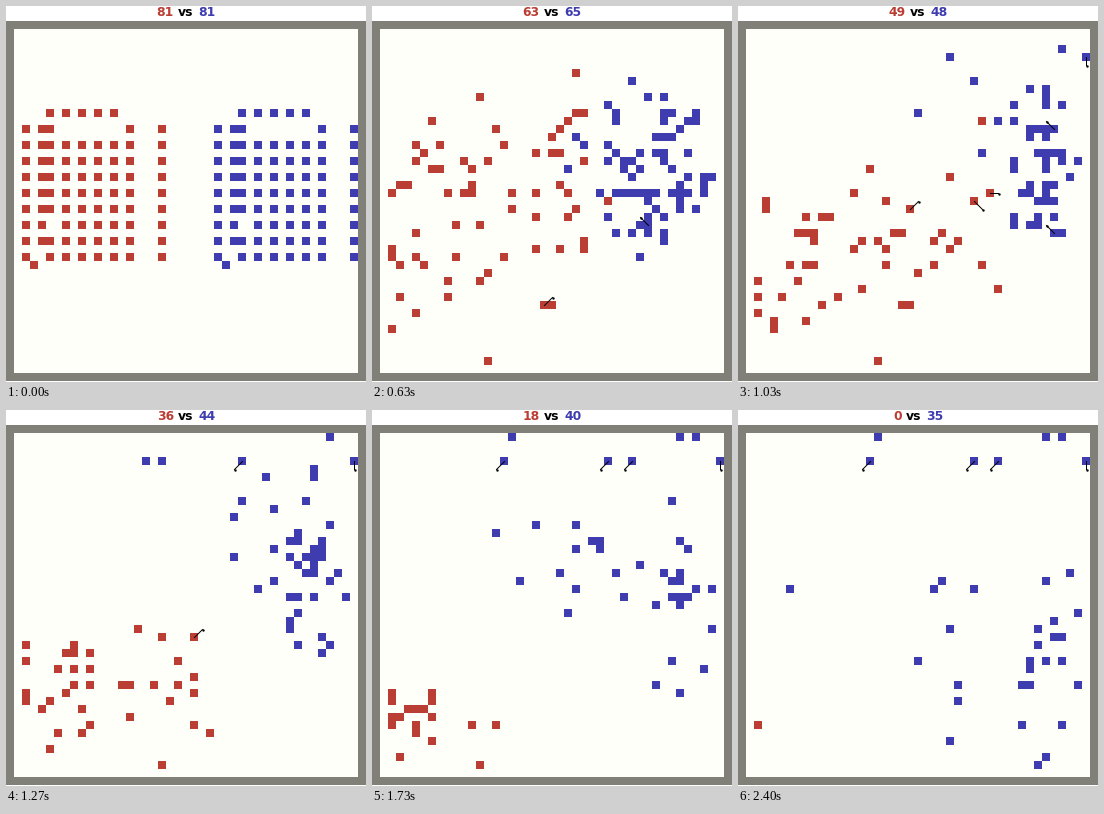
A matplotlib script for the animation above (2.43 s loop, 360 px wide and 376 px high).

```python
import numpy as np
import matplotlib.pyplot as plt
from matplotlib.animation import FuncAnimation

W, H = 360, 376
DPI = 80
PT = 72 / DPI
CELL, TOP, GRID = 8, 15, 45
TICK, LOOP, STEPS = 10, 2430, 73

FLOOR = (254, 255, 249)
WALL = (128, 128, 120)
RED = (186, 62, 52)
BLUE = (62, 60, 174)

# Survivors of each side over time.
SCORE_STEPS = [0, 10, 19, 31, 45, 59, 72]
SCORES = {"red": [81, 79, 63, 49, 24, 13, 0],
          "blue": [81, 79, 65, 48, 41, 39, 35]}

# Where each squad gathers: step, centre column and row, half width and height.
SQUADS = {
    "red front": [(10, 25, 19, 3, 8), (19, 26, 19, 3, 9),
                  (31, 31, 18, 5, 4), (45, 32, 30, 4, 5)],
    "red rear": [(10, 9, 22, 7, 15), (19, 11, 25, 8, 14), (31, 15, 30, 11, 8),
                 (45, 17, 35, 13, 4), (59, 13, 36, 11, 3), (72, 4, 34, 2, 2)],
    "blue front": [(10, 27, 19, 3, 9), (19, 29, 19, 5, 9),
                   (31, 35, 18, 5, 7), (72, 36, 29, 5, 8)],
    "blue guard": [(10, 36, 19, 5, 8), (31, 37, 18, 4, 7),
                   (45, 36, 17, 4, 8), (72, 35, 30, 6, 7)],
    "blue raiders": [(10, 37, 18, 5, 8), (31, 36, 16, 5, 8),
                     (45, 25, 14, 10, 6), (59, 16, 20, 10, 6),
                     (72, 17, 28, 10, 8)],
}

# Blue sentries leave for fixed posts along the top wall and stay there.
POSTS = [(43, 4), (38, 1), (40, 1), (32, 4), (29, 4), (17, 1), (16, 4)]
LEAVE = 22

rng = np.random.default_rng(7)


def formation():
    files = [7, 9, 11, 13, 15, 19]
    rows = {r: [2, 4, 5] + files for r in range(15, 29, 2)}
    rows.update({11: files[:-1], 13: [2, 4, 5, 15, 19], 25: [2, 4] + files,
                 29: [2, 5] + files, 30: [3]})
    rows[11] = [5] + files[:-2]
    return [(c, r) for r, cols in rows.items() for c in cols]


class Unit:
    def __init__(self, side, squad, cell):
        self.side, self.squad, self.cell = side, squad, cell
        self.offset = np.zeros(2)
        self.post = None

    def goal(self, step):
        if self.post and step >= LEAVE:
            return np.array(self.post)
        keys = np.array(SQUADS[self.squad]).T
        c, r, w, h = (np.interp(step, keys[0], k) for k in keys[1:])
        self.offset += rng.normal(0, 0.06, 2)
        return np.clip((c, r) + self.offset * (w, h), 2, GRID - 3)

    def move(self, step, taken):
        gap = np.rint(self.goal(step) - self.cell).astype(int)
        way = np.sign(gap)
        cell = (self.cell[0] + way[0], self.cell[1] + way[1])
        if cell not in taken:
            taken.discard(self.cell)
            taken.add(cell)
            self.cell = cell


def muster():
    units = []
    for i, (c, r) in enumerate(formation()):
        units.append(Unit("red", "red front" if c >= 11 else "red rear", (c, r)))
        squad = ("blue front" if c <= 7 else
                 "blue raiders" if (c + r + i) % 2 else "blue guard")
        units.append(Unit("blue", squad, (c + 24, r)))

    # Keep each unit's place within its squad, loosened by some noise.
    for name in SQUADS:
        squad = [u for u in units if u.squad == name]
        spots = np.array([u.cell for u in squad], float)
        low, high = spots.min(axis=0), spots.max(axis=0)
        places = 2 * (spots - low) / (high - low) - 1
        for u, place in zip(squad, places):
            u.offset = np.clip(0.8 * place + rng.normal(0, 0.35, 2), -1.2, 1.2)

    guards = [u for u in units if u.squad == "blue guard"]
    for u, post in zip(guards, POSTS):
        u.post = post
    return units


def gaps(units, foes):
    """Offset from each unit to its nearest foe."""
    a = np.array([u.cell for u in units])
    b = np.array([u.cell for u in foes])
    gap = b[None] - a[:, None]
    return gap[np.arange(len(a)), (gap ** 2).sum(axis=2).argmin(axis=1)]


def cull(units, foes, count):
    """Drop the units closest to the enemy, with some luck involved."""
    if len(units) <= count:
        return units
    risk = abs(gaps(units, foes)).max(axis=1) + 7 * rng.random(len(units))
    risk += [100 * bool(u.post) for u in units]
    keep = set(np.argsort(risk)[len(units) - count:])
    return [u for i, u in enumerate(units) if i in keep]


def strikes(units, foes):
    hits = []
    for u, gap in zip(units, gaps(units, foes)):
        reach = abs(gap).max()
        chance = 0.35 if reach <= 1 else 0.08 if reach <= 10 else 0
        way = np.sign(gap)
        if u.post == u.cell:
            if u.cell[1] > 1:
                hits.append((u.cell, (0 if u.cell[0] == GRID - 2 else -1, 1)))
        elif rng.random() < chance and way.any():
            hits.append((u.cell, tuple(way)))
    return hits


def battle():
    units = muster()
    red, blue = ([u for u in units if u.side == s] for s in ("red", "blue"))
    states = []
    for step in range(STEPS):
        score = [round(np.interp(step, SCORE_STEPS, SCORES[s]))
                 for s in ("red", "blue")]
        hits = []
        if step:
            taken = {u.cell for u in red + blue}
            for u in rng.permutation(np.array(red + blue, dtype=object)):
                u.move(step, taken)
            red = cull(red, blue, max(score[0], 1))
            blue = cull(blue, red, score[1])
            hits = strikes(red, blue) + strikes(blue, red)
        states.append(([u.cell for u in red], [u.cell for u in blue], hits, score))
    return states


states = battle()

field = np.full((GRID, GRID, 3), WALL, np.uint8)
field[1:-1, 1:-1] = FLOOR

fig = plt.figure(figsize=(W / DPI, H / DPI), dpi=DPI, facecolor="white")
ax = fig.add_axes([0, 0, 1, 1])
ax.axis("off")
board = ax.imshow(field, extent=(0, W, TOP + GRID * CELL, TOP),
                  interpolation="nearest", aspect="auto")
ax.set_xlim(0, W)
ax.set_ylim(H, 0)

lines, = ax.plot([], [], color="black", lw=PT)
tips, = ax.plot([], [], "o", color="black", ms=2.4 * PT, mew=0)

# Advance widths of the bold title face, in pixels.
SIZE = 12.4
DIGIT, SPACE, VS = 0.696 * SIZE, 0.348 * SIZE, 1.247 * SIZE


def label(color, text=""):
    return ax.text(0, 10.5, text, color=color, fontsize=SIZE * PT, va="baseline",
                   family="DejaVu Sans", weight="bold")


left = label(np.array(RED) / 255)
middle = label("black", "vs")
right = label(np.array(BLUE) / 255)


def set_title(score):
    a, b = map(str, score)
    x = (W - DIGIT * len(a + b) - 2 * SPACE - VS) / 2
    left.set_text(a)
    left.set_x(x)
    x += DIGIT * len(a) + SPACE
    middle.set_x(x)
    right.set_text(b)
    right.set_x(x + VS + SPACE)


def centre(c, r):
    return CELL * (c + 0.5) + 0.5, TOP + CELL * (r + 0.5) + 0.5


def update(tick):
    # Thirty steps a second, each starting on a 10 ms tick.
    red, blue, hits, score = states[min((3 * tick + 1) // 10, STEPS - 1)]
    img = field.copy()
    for team, color in ((red, RED), (blue, BLUE)):
        for c, r in team:
            img[r, c] = color
    board.set_data(img)

    xs, ys, ends = [], [], []
    for (c, r), (dx, dy) in hits:
        p, q = centre(c, r), centre(c + dx, r + dy)
        xs += [p[0], q[0], np.nan]
        ys += [p[1], q[1], np.nan]
        ends.append(q)
    lines.set_data(xs, ys)
    tips.set_data([x for x, _ in ends], [y for _, y in ends])
    set_title(score)
    return board, lines, tips, left, middle, right


anim = FuncAnimation(fig, update, frames=LOOP // TICK, interval=TICK,
                     repeat=True, repeat_delay=0, blit=False)
plt.show()
```
